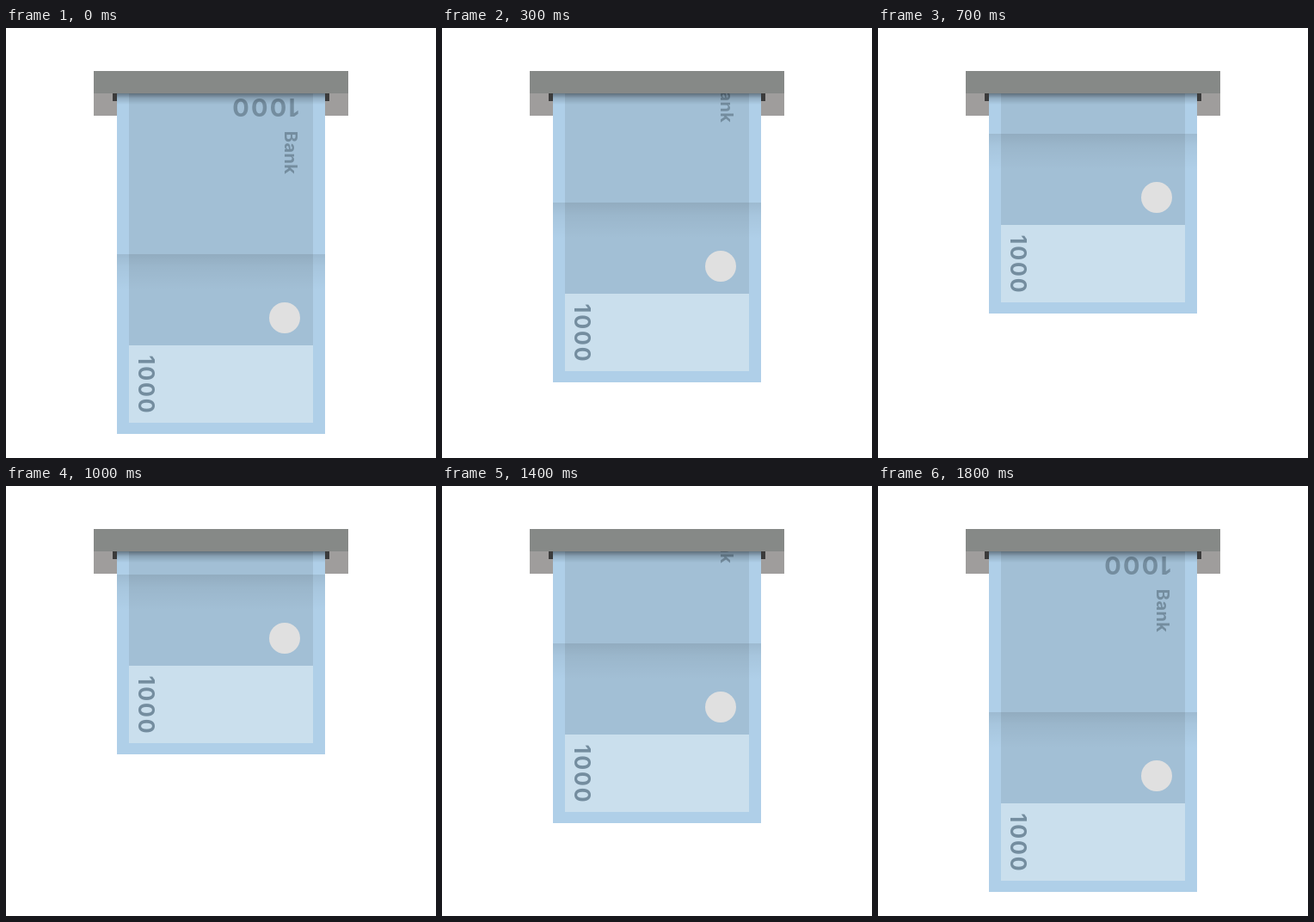
Write an HTML page that moves like this. It is 500 px wide and 500 px high and loops after 1900 ms.

```html
<!DOCTYPE html>
<html lang="en">
<head>
<meta charset="utf-8">
<title>Banknote slot</title>
<style>
  html, body { margin: 0; width: 100%; height: 100%; overflow: hidden; background: #fff; }
  svg { display: block; width: 500px; height: 500px; }
  text { font-family: Inter, sans-serif; font-weight: 700; fill: #748d9f; text-anchor: middle; }
  .value { letter-spacing: .075em; }
  .label { letter-spacing: .02em; }
</style>
</head>
<body>
<svg viewBox="0 0 500 500">
  <defs>
    <clipPath id="below"><rect x="102" y="76" width="296" height="424"/></clipPath>
    <linearGradient id="fold" x2="0" y2="1">
      <stop offset="0" stop-opacity=".1"/>
      <stop offset=".35" stop-opacity=".045"/>
      <stop offset="1" stop-opacity="0"/>
    </linearGradient>
    <linearGradient id="shade" x2="0" y2="1">
      <stop offset="0" stop-opacity=".42"/>
      <stop offset=".45" stop-opacity=".15"/>
      <stop offset="1" stop-opacity="0"/>
    </linearGradient>
  </defs>

  <rect x="102" y="76" width="296" height="26" fill="#9f9d9c"/>
  <rect x="124" y="76" width="252" height="9" fill="#3b3b3b"/>

  <g clip-path="url(#below)">
    <g id="note">
      <rect x="129" y="60" width="242" height="412" fill="#afcfe8"/>
      <rect x="143" y="60" width="214" height="309" fill="#a2bfd5"/>
      <rect x="143" y="369" width="214" height="90" fill="#cadfed"/>
      <rect x="129" y="263" width="242" height="42" fill="url(#fold)"/>
      <circle cx="324" cy="337" r="18" fill="#e0e0e0"/>
      <text class="value" font-size="29" transform="translate(301 82) rotate(180)">1000</text>
      <text class="label" font-size="20" transform="translate(324 145) rotate(90)">Bank</text>
      <text class="value" font-size="25" transform="translate(154 415) rotate(90)">1000</text>
    </g>
    <rect x="129" y="76" width="242" height="13" fill="url(#shade)"/>
  </g>

  <rect x="102" y="50" width="296" height="26" fill="#868987"/>
</svg>
<script>
  const STEPS = 19, STEP_MS = 100, STEP_PX = 20;

  // Up nine steps, back down nine, then one step of rest.
  const frames = Array.from({ length: STEPS + 1 }, (_, k) => ({
    offset: k / STEPS,
    transform: `translateY(${-STEP_PX * Math.max(0, Math.min(k, STEPS - 1 - k))}px)`,
    easing: 'step-end'
  }));

  document.getElementById('note').animate(frames, {
    duration: STEPS * STEP_MS,
    iterations: Infinity
  });
</script>
</body>
</html>
```
